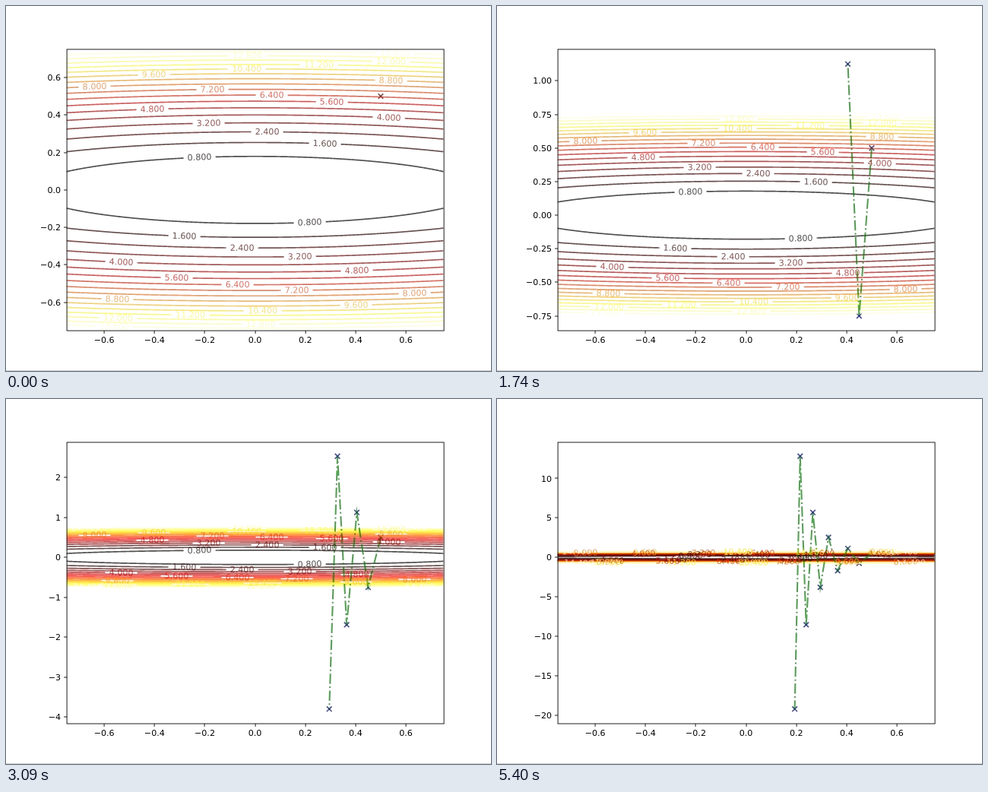
An HTML page with a canvas that plays this animation: 638x480 px, repeating every 5.43 s.

```html
<!DOCTYPE html>
<html lang="en">
<head>
<meta charset="utf-8">
<title>Gradient descent overshoot</title>
<style>
html, body { margin: 0; width: 100%; height: 100%; overflow: hidden; background: #fff; }
canvas { display: block; }
</style>
</head>
<body>
<canvas id="c" width="638" height="480"></canvas>
<script>
const canvas = document.getElementById('c');
const ctx = canvas.getContext('2d');
const LOOP = 5430, FIRST = 910, STEP = 455, LAST = 9;
const L = 80, R = 576, T = 57.5, B = 427.2, EDGE = 0.75;
const FONT = '11.11px "DejaVu Sans", sans-serif';
const ALPHA = 0.7;

// Label centres in pixels, one per level of 0.8, 1.6, 2.4 ...
const upperX = [255, 420, 344, 267, 504, 193, 429, 350, 272, 117, 507, 195, 317, 412, 507, 318, 512];
const lowerX = [400, 235, 311, 387, 152, 462, 225, 305, 383, 538, 147, 461, 338, 243, 148, 335, 143];

const px = x => L + (x + EDGE) / (2 * EDGE) * (R - L);
const dataX = p => (p - L) / (R - L) * 2 * EDGE - EDGE;

// Descent on x² + 25y² with a rate of 0.05
const points = Array.from({ length: LAST + 1 }, (_, k) => [0.5 * 0.9 ** k, 0.5 * (-1.5) ** k]);

function makeViews() {
  let lo = -EDGE, hi = EDGE, view = { lo, hi };
  return points.map(([, y], k) => {
    if (k) {
      const pad = 3.33 * (view.hi - view.lo) / (B - T);
      lo = Math.min(lo, y - pad);
      hi = Math.max(hi, y + pad);
      const m = 0.05 * (hi - lo);
      view = { lo: lo < -EDGE ? lo - m : lo, hi: hi > EDGE ? hi + m : hi };
    }
    return view;
  });
}
const views = makeViews();

function hot(t) {
  const c = v => Math.round(255 * Math.max(0, Math.min(1, v)));
  return `rgb(${c(0.0416 + t * 2.626)},${c((t - 0.365) / 0.381)},${c((t - 0.746) / 0.254)})`;
}

function tickStep(range) {
  const raw = range / 9, p = 10 ** Math.floor(Math.log10(raw));
  return [1, 2, 2.5, 5, 10].find(s => s * p >= raw) * p;
}

function line(x1, y1, x2, y2) {
  ctx.beginPath();
  ctx.moveTo(x1, y1);
  ctx.lineTo(x2, y2);
  ctx.stroke();
}

function text(s, x, y, align, angle = 0) {
  ctx.save();
  ctx.translate(x, y);
  ctx.rotate(angle);
  ctx.textAlign = align;
  ctx.fillText(s, 0, 4.05);
  ctx.restore();
}

const levels = [];
for (let i = 0; i < 18; i++) {
  const z = 0.8 * (i + 1);
  for (const side of [1, -1]) {
    const centres = i < 17 ? [(side > 0 ? upperX : lowerX)[i]] : side > 0 ? [105, 535] : [108, 545];
    levels.push({ z, side, centres, color: hot((z - 0.8) / 13.6) });
  }
}

const height = (z, x) => Math.sqrt((z - x * x) / 25);

function drawContour({ z, side, centres, color }, py) {
  const half = ctx.measureText(z.toFixed(3)).width / 2 + 5;
  ctx.strokeStyle = color;
  ctx.beginPath();
  let pen = false;
  for (let p = L; p <= R; p++) {
    const x = dataX(p), y = height(z, x);
    if (y > EDGE || centres.some(c => Math.abs(p - c) < half)) {
      pen = false;
      continue;
    }
    if (pen) ctx.lineTo(p, py(side * y));
    else ctx.moveTo(p, py(side * y));
    pen = true;
  }
  ctx.stroke();
}

function drawLabel({ z, side, centres, color }, py) {
  ctx.fillStyle = color;
  for (const c of centres) {
    const x = dataX(c), y = side * height(z, x);
    text(z.toFixed(3), c, py(y) - 0.5, 'center', Math.atan(0.745 * x / (25 * y)));
  }
}

function drawMarkers(k, py) {
  ctx.strokeStyle = k ? '#000080' : '#3a1418';
  ctx.lineWidth = 1.67;
  for (const [x, y] of points.slice(0, k + 1)) {
    const a = px(x), b = py(y), r = 3.33;
    line(a - r, b - r, a + r, b + r);
    line(a - r, b + r, a + r, b - r);
  }
}

function drawTrail(k, py) {
  if (!k) return;
  const w = 2.1;
  ctx.strokeStyle = '#008000';
  ctx.lineWidth = w;
  ctx.setLineDash([6.4 * w, 1.6 * w, w, 1.6 * w]);
  ctx.beginPath();
  for (const [x, y] of points.slice(0, k + 1)) ctx.lineTo(px(x), py(y));
  ctx.stroke();
  ctx.setLineDash([]);
}

function drawAxes(view, py) {
  ctx.strokeStyle = ctx.fillStyle = '#000';
  ctx.lineWidth = 0.89;
  ctx.strokeRect(80.5, 57.5, 496, 370);
  const name = (v, d) => v.toFixed(d).replace(/^-(?=0\.?0*$)/, '').replace('-', '\u2212');
  for (let i = -3; i <= 3; i++) {
    const x = Math.floor(px(i * 0.2)) + 0.5;
    line(x, 427.5, x, 431.4);
    text(name(i * 0.2, 1), px(i * 0.2), 439.8, 'center');
  }
  const s = tickStep(view.hi - view.lo);
  const digits = s >= 1 ? 0 : Math.abs(s - 0.25) < 0.01 ? 2 : 1;
  for (let i = Math.ceil(view.lo / s); i * s <= view.hi; i++) {
    const y = Math.floor(py(i * s)) + 0.5;
    line(76.5, y, 80.5, y);
    text(name(i * s, digits), 72.5, py(i * s), 'right');
  }
}

// Spread hue and saturation a little, keeping the brightness sharp
function softenColour() {
  ctx.save();
  ctx.globalCompositeOperation = 'color';
  ctx.filter = 'blur(1.2px)';
  ctx.drawImage(canvas, 0, 0);
  ctx.restore();
}

function draw(k) {
  const view = views[k];
  const py = y => T + (view.hi - y) / (view.hi - view.lo) * (B - T);
  ctx.fillStyle = '#fff';
  ctx.fillRect(0, 0, 638, 480);
  ctx.fillStyle = '#ccc';
  ctx.fillRect(0, 479, 638, 1);
  ctx.font = FONT;

  ctx.save();
  ctx.translate(-0.4, -0.5);
  ctx.save();
  ctx.beginPath();
  ctx.rect(L, T, R - L, B - T);
  ctx.clip();
  ctx.globalAlpha = ALPHA;
  drawMarkers(k, py);
  ctx.lineWidth = 1.67;
  for (const lv of levels) drawContour(lv, py);
  drawTrail(k, py);
  for (const lv of levels) drawLabel(lv, py);
  ctx.restore();
  drawAxes(view, py);
  ctx.restore();

  softenColour();
}

const start = performance.now();
let shown = -1;
function tick() {
  const t = (performance.now() - start) % LOOP;
  const k = Math.max(0, Math.min(LAST, Math.floor((t - FIRST) / STEP) + 1));
  if (k !== shown) draw(shown = k);
  requestAnimationFrame(tick);
}
tick();
</script>
</body>
</html>
```
